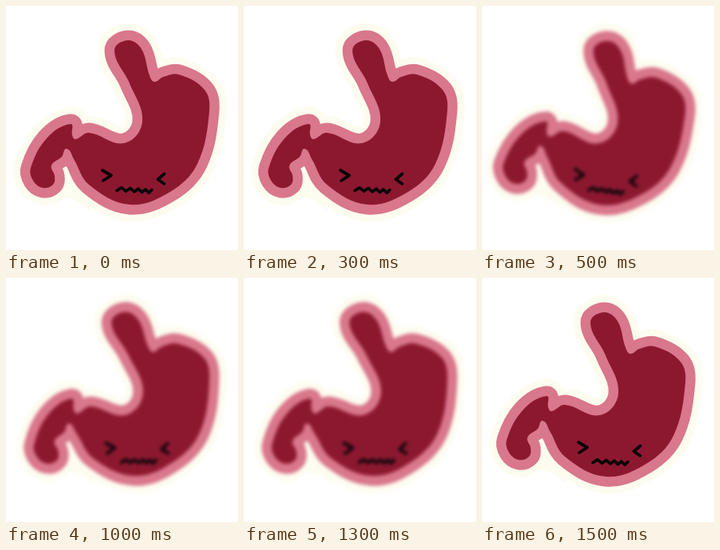
These frames come from a looping animation (291 px wide and 306 px high, 2000 ms). An HTML page:

```html
<!DOCTYPE html>
<html lang="en">
<head>
<meta charset="utf-8">
<title>Queasy stomach</title>
<style>
  html, body { margin: 0; width: 100%; height: 100%; overflow: hidden; background: #fff; }
  svg { display: block; width: 100vw; height: 100vh; }
  path { stroke-linejoin: round; stroke-linecap: round; }
</style>
</head>
<body>
<svg viewBox="0 0 291 306">
  <defs>
    <filter id="soft" filterUnits="userSpaceOnUse" x="-20" y="-20" width="331" height="346" color-interpolation-filters="sRGB">
      <feGaussianBlur stdDeviation="2.2"/>
    </filter>
  </defs>
  <g id="blur">
    <g id="body">
      <path class="skin" fill="#fdfcf0" stroke="#fdfcf0" stroke-width="43"/>
      <path fill="#fdfcf0" d="M66 242Q82 236 106 258L78 200Z"/>
      <path class="skin" fill="#d9778c" stroke="#d9778c" stroke-width="25"/>
      <path class="skin" fill="#8c1830"/>
      <g fill="none" stroke="#0c0508" stroke-width="3.8">
        <path d="M121 206L132 212.500L122 219"/>
        <path d="M198.500 210.500L190.500 217.500L198.500 223"/>
        <path id="mouth"/>
      </g>
    </g>
  </g>
</svg>
<script>
const LOOP = 2000, HOLD = 500, SWAY = 3;

// Key points, clockwise in each part.
const tube = [[155, 97], [136, 56], [153, 43], [170, 54], [180, 87], [186, 95]];
const belly = [[197, 89], [217, 86], [249, 105], [255, 132], [240, 198], [206, 233], [155, 249], [104, 224], [85, 192]];
const duct = [[76, 179], [70, 189], [57, 200], [61, 213], [59, 224], [46, 228], [34, 219], [31, 203], [51, 166], [81, 148], [83, 162]];
const saddle = [[87, 167], [104, 159], [148, 172], [171, 145]];

// Closed smooth curve; handles follow the neighbours and scale with the segment.
function smooth(pts) {
  const n = pts.length, at = i => pts[(i + n) % n];
  const handle = (i, reach) => {
    const [x, y] = at(i), [ax, ay] = at(i - 1), [bx, by] = at(i + 1);
    const k = reach / Math.hypot(bx - ax, by - ay);
    return [x + (bx - ax) * k, y + (by - ay) * k];
  };
  let d = "M" + pts[0];
  for (let i = 0; i < n; i++) {
    const [x, y] = at(i), [u, v] = at(i + 1);
    const reach = 0.36 * Math.hypot(u - x, v - y);
    d += `C${handle(i, reach)} ${handle(i + 1, -reach)} ${at(i + 1)}`;
  }
  return d + "Z";
}

// Zigzag that sinks and tightens to the right.
function zigzag() {
  const pts = Array.from({ length: 10 }, (_, i) =>
    [139 + 6 * i - i * i / 8, 230.5 + i * 0.35 + (i % 2 ? -3 : 1)]);
  return "M" + pts.join("L");
}

const shape = smooth([...tube, ...belly, ...duct, ...saddle]);
document.querySelectorAll(".skin").forEach(p => p.setAttribute("d", shape));
document.getElementById("mouth").setAttribute("d", zigzag());

const blur = document.getElementById("blur");
const body = document.getElementById("body");

// Upright, lean right, lean left, upright.
function draw(ms) {
  const step = Math.floor(ms % LOOP / HOLD);
  const tilt = step === 1 ? SWAY : step === 2 ? -SWAY : 0;
  body.setAttribute("transform", `rotate(${tilt} 143 127)`);
  if (tilt) blur.setAttribute("filter", "url(#soft)");
  else blur.removeAttribute("filter");
}

const start = performance.now();
function tick() {
  draw(performance.now() - start);
  requestAnimationFrame(tick);
}
tick();
</script>
</body>
</html>
```
